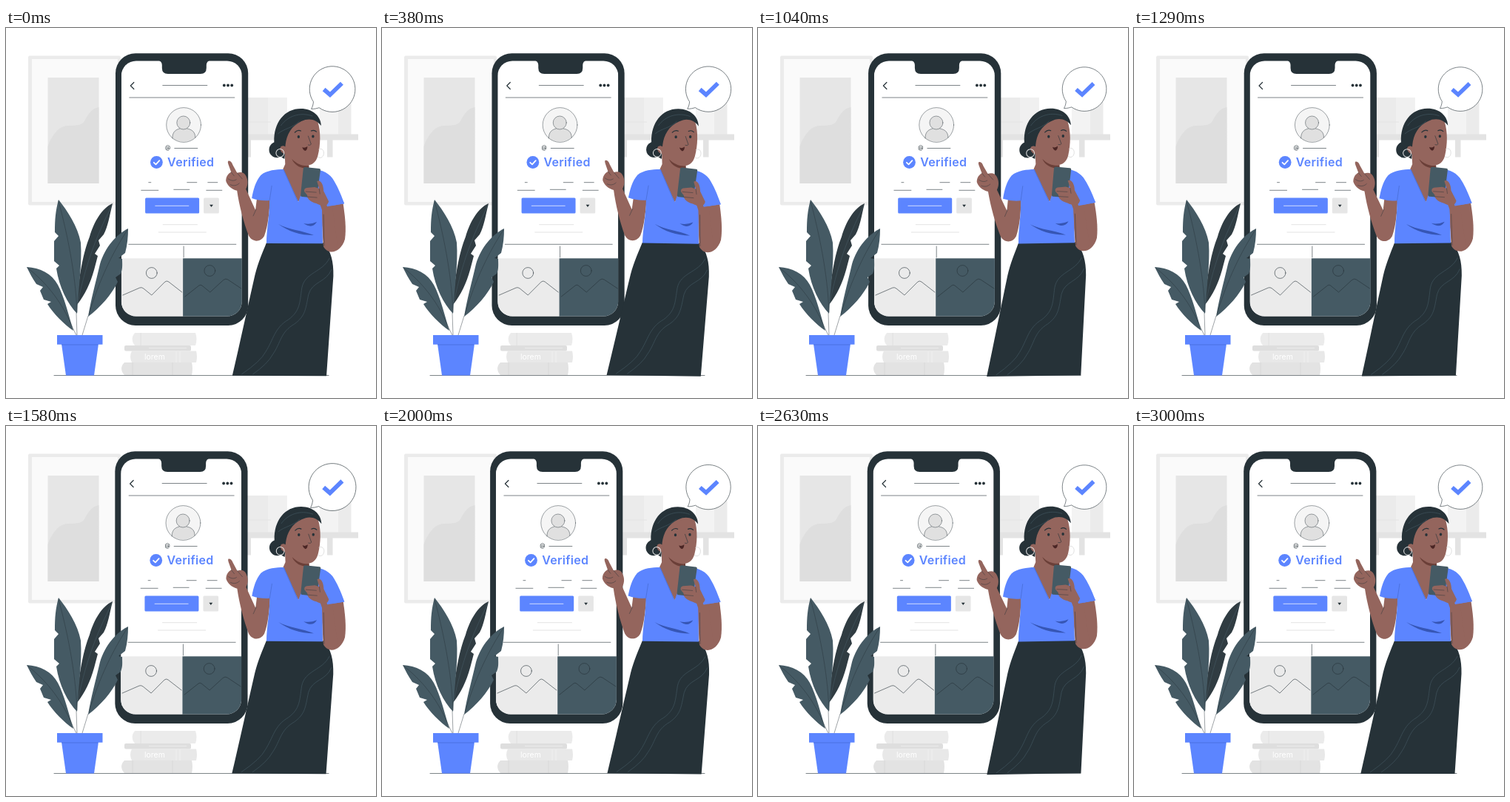
Animation of 500x500 px, one loop 3.04 s. Source, as an HTML page:

```html
<!DOCTYPE html>
<html lang="en">
<head>
<meta charset="utf-8">
<title>Verified profile</title>
<style>
html, body { margin: 0; width: 100%; height: 100%; overflow: hidden; background: #fff; }
svg { display: block; width: 100vw; height: 100vh; }
.ink { fill: none; stroke: #263238; stroke-width: .6; stroke-linecap: round; stroke-linejoin: round; }
.hair { stroke-width: .45; }
.bold { stroke-width: 1.2; }
.blue { fill: #5c85ff; }
.dark { fill: #263238; }
.slate { fill: #455a64; }
.skin { fill: #94655d; }
.pale { fill: #ebebeb; }
.grey { fill: #e3e3e3; }
.white { fill: none; stroke: #fff; stroke-linecap: round; stroke-linejoin: round; }
</style>
</head>
<body>
<svg viewBox="0 0 500 500">
  <defs>
    <clipPath id="screen"><rect x="156" y="44.500" width="163" height="345" rx="20"/></clipPath>
  </defs>

  <!-- wall picture -->
  <g>
    <rect class="pale" x="30" y="37.500" width="125" height="202" rx="2"/>
    <rect x="35" y="42" width="116" height="193" fill="#fafafa"/>
    <rect x="56.500" y="67" width="69" height="143" fill="#e6e6e6"/>
    <path d="M56.500 210V160C62 146 70 133 83 132C94 131 101 133 106 126C111 116 117 108 125.500 107V210Z" fill="#dedede"/>
  </g>

  <!-- shelf -->
  <g>
    <rect class="pale" x="322" y="94" width="57.500" height="50"/>
    <rect x="354" y="94" width="25.500" height="50" fill="#f0f0f0"/>
    <path d="M328 127H358" stroke="#e3e3e3"/>
    <rect x="424" y="103" width="27" height="41" fill="#f3f3f3"/>
    <rect class="pale" x="449" y="100" width="17.500" height="44"/>
    <rect class="grey" x="320" y="143.500" width="156" height="8"/>
    <path class="grey" d="M324 151H331V174.500H324ZM434 151H441.500V174.500H434Z"/>
  </g>

  <!-- books on the floor -->
  <g>
    <path class="pale" d="M174 412H256Q259 420 256 429H174Q167 420 174 412Z"/>
    <path d="M182 412V429" stroke="#e0e0e0"/>
    <rect x="160" y="429" width="90" height="7.500" rx="2" fill="#dedede"/>
    <path d="M193 432.500H244" stroke="#ebebeb"/>
    <path d="M170 436.500H257Q259 444 257 452H170Q166 444 170 436.500Z" fill="#e8e8e8"/>
    <text x="187" y="448" font-family="Inter, sans-serif" font-size="10.500" fill="#fff">lorem</text>
    <path d="M230 437V452M235 437V452" stroke="#f0f0f0"/>
    <path class="grey" d="M160 452H251Q253 460 251 469H160Q152 460 160 452Z"/>
    <path d="M171 452V469M225 452V469" stroke="#d8d8d8"/>
  </g>

  <path class="ink" d="M65 469.500H436"/>

  <g id="phone">
    <rect class="dark" x="148.200" y="34.200" width="179.200" height="367.800" rx="27"/>
    <g clip-path="url(#screen)">
      <rect x="156" y="44" width="163" height="347" fill="#fff"/>
      <rect class="pale" x="156" y="311.300" width="83.300" height="80"/>
      <rect class="slate" x="239.300" y="311.300" width="81" height="80"/>
    </g>
    <path class="dark" d="M205 43H277Q271 45 271 50V54Q271 62 263 62H219Q211 62 211 54V50Q211 45 205 43Z"/>
    <path class="ink bold" d="M173 73.500L168.500 78L173 82.500"/>
    <path class="ink" d="M212 77.500H272M167 94H309M228 162.500H259"/>
    <g class="dark"><circle cx="295" cy="77.500" r="1.900"/><circle cx="300.200" cy="77.500" r="1.900"/><circle cx="305.400" cy="77.500" r="1.900"/></g>

    <circle cx="240.300" cy="131" r="23.400" fill="#f5f5f5"/>
    <path d="M225 149C225 139 231 137 235 136H245C251 137 256 140 256 148C248 155 234 155 225 149Z" fill="#e0e0e0"/>
    <circle cx="240" cy="128" r="9" fill="#e0e0e0"/>
    <g class="ink hair"><circle cx="240.300" cy="131" r="23.400"/><circle cx="240" cy="128" r="9"/>
      <path d="M225 149C225 139 231 137 235 136M245 136C251 137 256 140 256 148"/></g>

    <text x="215.300" y="163.500" font-family="Inter, sans-serif" font-size="7.500" fill="#263238">@</text>
    <circle class="blue" cx="203.600" cy="181.500" r="8.400"/>
    <path class="white" stroke-width="1.800" d="M200 181.800L202.700 184.300L207.500 179.200"/>
    <text class="blue" x="218.300" y="187" font-family="Inter, sans-serif" font-size="16" font-weight="600" letter-spacing=".3">Verified</text>

    <path class="ink" d="M193 208.700H196M245 208.700H258M273 208.700H286M183 219.300H206M227 218.300H248M271 219.300H292"/>
    <rect class="blue" x="188.300" y="229.500" width="73" height="21" rx="1.500"/>
    <path class="white" stroke-width=".7" d="M202 240.300H247"/>
    <rect x="267.300" y="229.500" width="20.700" height="21" rx="1.500" fill="#e6e6e6"/>
    <path class="dark" d="M275.300 238.800H280.100L277.700 242Z"/>
    <path d="M212 265.700H259M206 276H271" stroke="#e3e3e3"/>
    <path class="ink" d="M166 292.300H311M240.300 295V310"/>
    <g class="ink"><circle cx="197" cy="331" r="7.400"/><circle cx="275.500" cy="328" r="7.400"/>
      <path d="M158 361L181 351Q183.500 350 186 352L197 361L215 343Q217.500 341 220 343L238 357"/>
      <path d="M242 363L261 348Q263 346.500 265 348L276 357L294 340.500Q297 338 300 340L318 352"/></g>
  </g>

  <!-- plant -->
  <g>
    <path class="white" stroke-width="3" d="M96 384L97 416M112 388L103 416M90 405L95 416"/>
    <path class="ink hair" d="M95 385L96 415M111 389L103 415M91 407L95 415"/>
    <path d="M144 237C129 244 119 262 113 282C105 302 98 335 96 374C107 360 114 345 119 327L124 308L120 305L127 294L125 287L132 279C138 268 140 253 144 237Z" fill="#303c42"/>
    <path class="slate" d="M71 232C83 247 97 268 101 290C103 318 98 350 96 386C83 372 72 351 68 325L72 321L65 315V288L71 281L66 276C66 258 67 247 71 232Z"/>
    <path class="slate" d="M165 271C149 279 134 296 127 319C121 345 115 366 111 390C127 378 143 360 151 343L148 337L155 332C158 325 157 319 157 312L152 311L161 304C164 293 165 282 165 271Z"/>
    <path class="slate" d="M28 323C46 324 62 332 70 347C79 364 84 386 91 409C78 400 64 386 56 373L61 370L51 367L46 355L50 350L41 346C36 339 32 331 28 323Z"/>
    <path class="ink hair" d="M71 234C82 275 94 330 96 384M164 273C145 302 126 340 112 387M29 324C53 343 75 368 91 407"/>
    <path d="M143 240C128 270 109 310 97 372" fill="none" stroke="#455a64" stroke-width=".6"/>
    <path class="blue" d="M75 427H125L119 469.500H81Z"/>
    <rect class="blue" x="69" y="415" width="61.500" height="12.700"/>
    <path d="M75 428H124" stroke="#3f64ce" stroke-width=".6"/>
  </g>

  <g id="bubble">
    <path d="M416.300 99.200C416 103 415 106 413.500 108.500C417.500 108.800 421 107.700 423.800 106.900A29.800 29.800 0 1 0 416.300 99.200Z" fill="#fff" stroke="#263238" stroke-width=".6"/>
    <path d="M430 83L438 90L453.500 75" fill="none" stroke="#5c85ff" stroke-width="5.500"/>
  </g>

  <g id="woman">
    <!-- pointing arm -->
    <path class="skin" d="M300 180C303 179 305 182 306 185L312 196C318 194 322 196 324 200C327 206 327 212 324 218L337 246L339 229L357 226C356 248 354 268 349 281C344 290 333 290 328 281C321 263 315 240 312 220C304 218 299 213 297 207C297 201 300 197 304 195L300 184Q299 181 300 180Z"/>
    <path class="ink hair" d="M304 195L308 200M300 204C304 207 308 207 311 205M303 212C308 214 312 213 315 210M312 196L319 204M338 245L334 254"/>

    <!-- head -->
    <circle class="dark" cx="366" cy="164.500" r="10.800"/>
    <path class="skin" d="M376 160H409V191C418 192 412 207 395 235L373 193L377 184Z"/>
    <path d="M386 177C393 184 401 187 409 186V190C398 190 390 186 386 177Z" fill="#6b3f38"/>
    <path class="skin" d="M376 145C382 117 410 112 421 127C425 140 425 157 421 173C418 184 410 187 402 185C391 182 383 173 376 166Z"/>
    <path class="dark" d="M362 154C361 128 376 109 398 109C414 109 425 119 425.500 132C420 125 413 122 404 124C389 129 381 139 378 153C376 164 377 171 376 177C368 173 363 165 362 154Z"/>
    <path d="M367 143C375 136 387 135 396 126M371 132C380 119 397 113 414 119" fill="none" stroke="#455a64" stroke-width=".6"/>
    <path class="skin" d="M378 161C373 157 368 161 371 166C373 170 377 171 380 169Z"/>
    <circle cx="370" cy="169" r="5.400" fill="none" stroke="#e6e6e6" stroke-width="1"/>
    <path d="M422 164C428 161 431 168 428 173Q425 177 421 174" fill="none" stroke="#d8d8d8" stroke-width=".8"/>
    <g class="dark"><ellipse cx="395" cy="147" rx="1.700" ry="2"/><ellipse cx="414.500" cy="146.500" rx="1.700" ry="2"/></g>
    <path class="ink bold" d="M390 141Q394 137 398 139M412 139Q416 137 419 140"/>
    <path class="ink" d="M408 146L412 157Q411 159 408 158"/>
    <path d="M400 161Q403 163 407 160Q407 165 404 166Q401 165 400 161Z" fill="#4a2524"/>

    <!-- skirt -->
    <path class="dark" d="M352 290H430C439 302 443 315 442.500 335L433.500 470H306.300C316 428 327 376 336.500 334C341 316 347 303 352 290Z"/>
    <path d="M437 311C428 330 404 330 400 351C397 371 398 382 382 394C363 405 362 421 351 438Q345 450 319 468M440 326C433 344 414 342 409 360C405 380 405 389 390 400C371 411 372 425 361 441Q354 454 334 468" fill="none" stroke="#455a64" stroke-width=".6"/>

    <!-- blouse and right arm -->
    <path class="skin" d="M430 238L455 234C458 253 460 270 458 285C453 303 436 308 429 295L425 239Z"/>
    <path class="blue" d="M375 191C366 191 352 192 344 199C337 207 334 219 332 230Q343 234 356 233C356 255 352 272 352 291H428L427 242L457 237C452 223 447 212 441 203C434 194 424 191 410 190L395 235Z"/>
    <path class="skin" d="M422 232L440 236L448 292C446 302 433 303 429 294L427 246Z"/>
    <path class="blue" d="M425 218L441 204L457 237L434 241Z"/>
    <path d="M368 265C383 273 399 273 416 280C397 280 382 275 368 265ZM402 264Q411 266 420 262Q414 272 402 264Z" fill="#3656b5"/>
    <path d="M356 233L359 213M375 192L394 234" fill="none" stroke="#4266c8" stroke-width=".6"/>

    <!-- handset -->
    <path class="slate" d="M404 188L423 190Q425 190 424.700 192L420 227Q420 230 417 229.500L400 228Q397.500 228 398 225L401.500 190Q402 188 404 188Z"/>
    <path class="skin" d="M420 207C425 204 429 212 429 220L436 234C434 242 427 241 419 237C411 235 406 230 407 226L403 221Q402 217 406 216L417 215L423 217Z"/>
    <path class="ink hair" d="M405 221L419 222M407 228L420 229M423 217L424 224M429 252L430 294"/>
  </g>
</svg>
<script>
const LOOP = 3040, FRAMES = 73, SPAN = 3000;
const shake = [[0, 0], [.1, -1], [.2, 2], [.3, -4], [.4, 4], [.5, -4], [.6, 4], [.7, -4], [.8, 2], [.9, -1], [1, 0]];
const sway = [[0, 0], [.25, 1], [.75, -1], [1, 0]];
const beat = [[0, 1], [.12, 1.11], [.34, 1], [.44, 1.1], [.7, 1], [1, 1]];

// Linear interpolation through [position, value] keys
function track(keys, p) {
  const n = keys.findIndex(k => k[0] > p);
  if (n < 0) return keys.at(-1)[1];
  const [a, u] = keys[n - 1], [b, v] = keys[n];
  return u + (v - u) * (p - a) / (b - a);
}

const part = id => document.getElementById(id);
const phone = part('phone'), woman = part('woman'), bubble = part('bubble');

function draw(now) {
  // Motion advances in 24 steps a second
  const step = Math.floor((now % LOOP + 5) / (1000 / 24));
  const t = Math.min(SPAN, (step + 1) * SPAN / FRAMES + 15);
  const half = t % 1500 / 1500;
  phone.setAttribute('transform', `translate(${track(shake, t / SPAN)} 0)`);
  woman.setAttribute('transform', `rotate(${track(sway, half)} 379 290)`);
  bubble.setAttribute('transform', `translate(441.5 83) scale(${track(beat, half)}) translate(-441.5 -83)`);
}

const start = performance.now();
function tick() {
  draw(performance.now() - start);
  requestAnimationFrame(tick);
}
tick();
</script>
</body>
</html>
```
